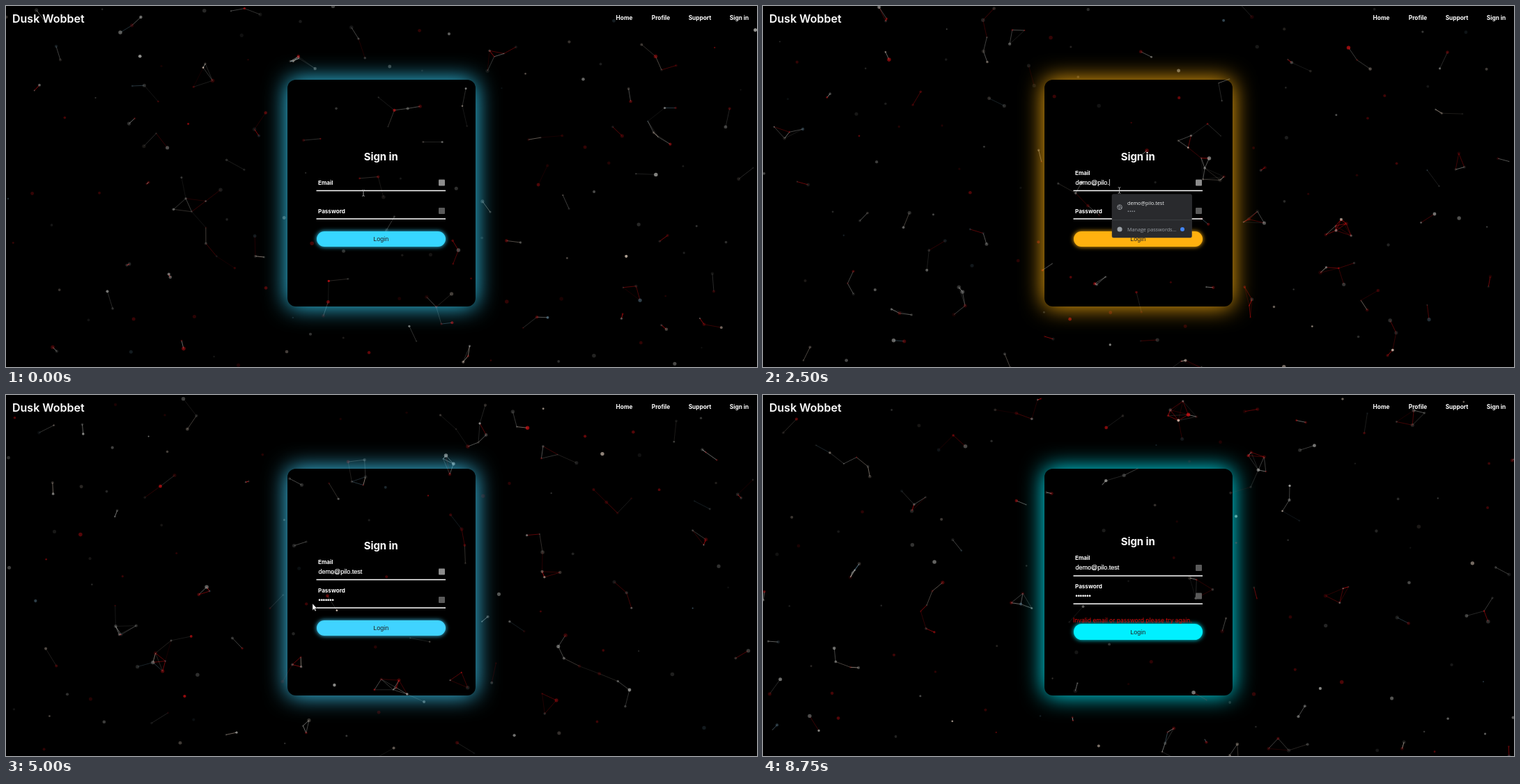
Animation, 1078 px wide and 519 px high, one loop 9 s. Source, as an HTML page with a canvas:

```html
<!DOCTYPE html>
<html lang="en">
<head>
<meta charset="utf-8">
<title>Sign in</title>
<style>
  html, body { margin: 0; width: 100%; height: 100%; overflow: hidden; background: #000; }
  #stage { position: absolute; left: 0; top: 0; width: 1078px; height: 519px; overflow: hidden; }
  #stage > * { position: absolute; left: 0; top: 0; }
  #card { left: 403.5px; top: 105.5px; width: 270px; height: 326px; border-radius: 12px; box-shadow: 0 0 33px var(--glow); }
  #button { left: 445.5px; width: 185.5px; height: 22.5px; border-radius: 12px; background: var(--glow); box-shadow: 0 0 6px var(--glow); }
  text { font-family: Inter, Lato, sans-serif; fill: #fff; white-space: pre; }
  .brand { font-size: 16px; font-weight: 600; }
  .nav { font-size: 8.3px; font-weight: 700; text-anchor: middle; }
  .heading { font-size: 14.8px; font-weight: 700; text-anchor: middle; }
  .label { font-size: 8.1px; font-weight: 700; }
  .value { font-family: "Liberation Sans", Arial, sans-serif; font-size: 9px; }
  .typed { stroke: #fff; stroke-width: .2; }
  .login { fill: #222; text-anchor: middle; }
  .error { font-size: 8.5px; fill: #e00a0a; }
  .menu { font-family: "Open Sans", sans-serif; font-size: 7.2px; fill: #f1f3f4; }
  .muted { fill: #9aa0a6; }
</style>
</head>
<body>
<div id="stage">
  <canvas id="sky" width="1078" height="519"></canvas>
  <div id="card"></div>
  <div id="button"></div>
  <svg width="1078" height="519" viewBox="0 0 1078 519">
    <text class="brand" x="9" y="23.5">Dusk Wobbet</text>
    <text class="nav" x="887.5" y="20">Home</text>
    <text class="nav" x="940" y="20">Profile</text>
    <text class="nav" x="996" y="20">Support</text>
    <text class="nav" x="1052.5" y="20">Sign in</text>

    <g id="form">
      <text class="heading" x="538.3" y="222">Sign in</text>
      <text class="label" id="emailLabel" x="448">Email</text>
      <text class="value typed" id="email" x="448.5" y="257"></text>
      <text class="label" id="passwordLabel" x="448">Password</text>
      <text class="value typed" id="password" x="448.5" y="297.5"></text>
      <path d="M445.5 265.5H631M445.5 305.9H631" stroke="#fff" stroke-width="1.5"/>
      <rect id="emailBadge" x="621" y="249.5" width="9" height="9" rx="1"/>
      <rect x="621" y="290" width="9" height="9" rx="1" fill="#5a5a5a"/>
    </g>
    <rect id="caret" width=".8" height="9.5" fill="#fff"/>
    <text class="value login" id="login" x="538.3">Login</text>
    <text class="error" id="error" x="445" y="327">Invalid email or password please try again.</text>

    <g id="menu">
      <rect x="501" y="270.7" width="114.5" height="62.3" rx="2" fill="#292a2d" stroke="#3a3b3e" stroke-width=".5"/>
      <path d="M501 307.6h114.5" stroke="#3f4246" stroke-width=".8"/>
      <g fill="none" stroke="#a5a9ae" stroke-width=".8">
        <circle cx="512" cy="289.2" r="3.4"/>
        <path d="M509 288l2 1 1 2-1 1.4M512 286l-.5 1.7 2 1 .5 1.8 1.2.2"/>
      </g>
      <text class="menu" x="523" y="286">demo@pilo.test</text>
      <text class="menu muted" x="523" y="298" letter-spacing=".2">••••</text>
      <circle cx="512" cy="321" r="3.6" fill="#9aa0a6"/>
      <text class="menu muted" x="523" y="323.6">Manage passwords...</text>
      <circle cx="602" cy="321" r="3" fill="#4285f4"/>
    </g>

    <path id="beam" d="M-1.8-4.3Q0-4.3 0-3.3Q0-4.3 1.8-4.3M0-3.3V3.3M-1.8 4.3Q0 4.3 0 3.3Q0 4.3 1.8 4.3" fill="none" stroke="#c8c8c8" stroke-width=".8"/>
    <path id="arrow" d="M0 0V9.4L2.2 7.4L3.8 10.8L5.2 10.1L3.7 6.9H6.6Z" fill="#fff" stroke="#222" stroke-width=".4"/>
  </svg>
</div>
<script>
const LOOP = 9000, STEP = 250, W = 1078, H = 519, LINK = 31;
const EMAIL = 'demo@pilo.test';
const $ = id => document.getElementById(id);
const ctx = $('sky').getContext('2d');

// Keyframes: time followed by values
const GLOW = [[0, 55, 214, 255], [1250, 255, 122, 255], [2500, 255, 177, 15], [2750, 255, 177, 10],
  [4250, 255, 125, 255], [5250, 0, 240, 255]];
const ARROW = [[5000, 440, 300], [5750, 222, 230], [6250, 250, 190], [7250, 505, 18.5], [7750, 540, -20]];
const BEAM = [[0, 513, 269], [1000, 511.5, 265]];
const EMAIL_KEYS = [[750, 1], [1250, 3], [1500, 4], [2500, 10], [3000, 14]];
const PASSWORD_KEYS = [[3250, 1], [4250, 5], [4750, 7]];

function along(keys, t) {
  if (t <= keys[0][0]) return keys[0].slice(1);
  const i = keys.findIndex(k => k[0] > t);
  if (i < 0) return keys[keys.length - 1].slice(1);
  const a = keys[i - 1], b = keys[i];
  const u = (t - a[0]) / (b[0] - a[0]);
  return a.slice(1).map((v, j) => v + (b[j + 1] - v) * u);
}

const typed = (keys, t) => t < keys[0][0] ? 0 : Math.floor(along(keys, t)[0]);

function random(seed) {
  return () => {
    seed = (seed + 0x6d2b79f5) | 0;
    let r = Math.imul(seed ^ seed >>> 15, seed | 1);
    r ^= r + Math.imul(r ^ r >>> 7, r | 61);
    return ((r ^ r >>> 14) >>> 0) / 4294967296;
  };
}

const rnd = random(41);
const tint = () => {
  const r = rnd();
  return r < .36 ? '245,18,22' : r < .8 ? '195,195,191' : r < .94 ? '245,224,206' : '95,130,150';
};
const stars = Array.from({ length: 225 }, () => {
  const angle = rnd() * Math.PI * 2, speed = .015 + rnd() * .06;
  return {
    x: rnd() * W, y: rnd() * H,
    vx: Math.cos(angle) * speed, vy: Math.sin(angle) * speed,
    size: 1 + rnd() * 1.8, color: tint(), line: tint(),
    alpha: .18 + .5 * rnd() ** 2, phase: rnd() * 6.28
  };
});

const wrap = (v, size) => ((v + 10) % (size + 20) + size + 20) % (size + 20) - 10;

function drawSky(t) {
  ctx.clearRect(0, 0, W, H);
  const dots = stars.map(s => ({ ...s, x: wrap(s.x + s.vx * t, W), y: wrap(s.y + s.vy * t, H) }));
  ctx.lineWidth = .75;
  dots.forEach((a, i) => {
    for (const b of dots.slice(i + 1)) {
      const d = Math.hypot(a.x - b.x, a.y - b.y);
      if (d > LINK) continue;
      ctx.strokeStyle = `rgba(${a.line},${.95 * (1 - d / LINK) + .12})`;
      ctx.beginPath();
      ctx.moveTo(a.x, a.y);
      ctx.lineTo(b.x, b.y);
      ctx.stroke();
    }
    ctx.fillStyle = `rgba(${a.color},${a.alpha * (.8 + .35 * Math.sin(t / 500 + a.phase))})`;
    ctx.beginPath();
    ctx.arc(a.x, a.y, a.size, 0, 7);
    ctx.fill();
  });
}

const show = (id, on) => $(id).setAttribute('visibility', on ? 'visible' : 'hidden');
const move = (id, x, y) => $(id).setAttribute('transform', `translate(${x} ${y})`);

function render(t) {
  const failed = t >= 5250, shift = failed ? 5.6 : 0;
  const onEmail = t >= 500 && t < 3250, onPassword = t >= 3250 && t < 5000;
  drawSky(t);

  $('stage').style.setProperty('--glow', `rgb(${along(GLOW, t).map(Math.round)})`);
  $('button').style.top = 323.5 + shift + 'px';
  $('login').setAttribute('y', 338 + shift);
  move('form', 0, -shift);
  show('error', failed);

  $('email').textContent = EMAIL.slice(0, typed(EMAIL_KEYS, t));
  $('password').textContent = '•'.repeat(typed(PASSWORD_KEYS, t));
  $('emailLabel').setAttribute('y', t >= 500 ? 243 : 257);
  $('passwordLabel').setAttribute('y', t >= 3250 ? 283.5 : 297.5);
  $('emailBadge').setAttribute('fill', failed ? '#5a5a5a' : '#8c8c8c');

  const field = $(onEmail ? 'email' : 'password');
  const width = field.textContent ? field.getComputedTextLength() : 0;
  move('caret', 448.7 + width, onEmail ? 249 : 289.3);
  show('caret', onEmail || onPassword);
  show('menu', onEmail);

  move('beam', ...along(BEAM, t));
  move('arrow', ...along(ARROW, t));
  show('beam', t < 5000);
  show('arrow', t >= 5000);
}

let last = -1;
function tick() {
  const t = Math.floor(performance.now() % LOOP / STEP) * STEP;
  if (t !== last) render(last = t);
  requestAnimationFrame(tick);
}
tick();
</script>
</body>
</html>
```
